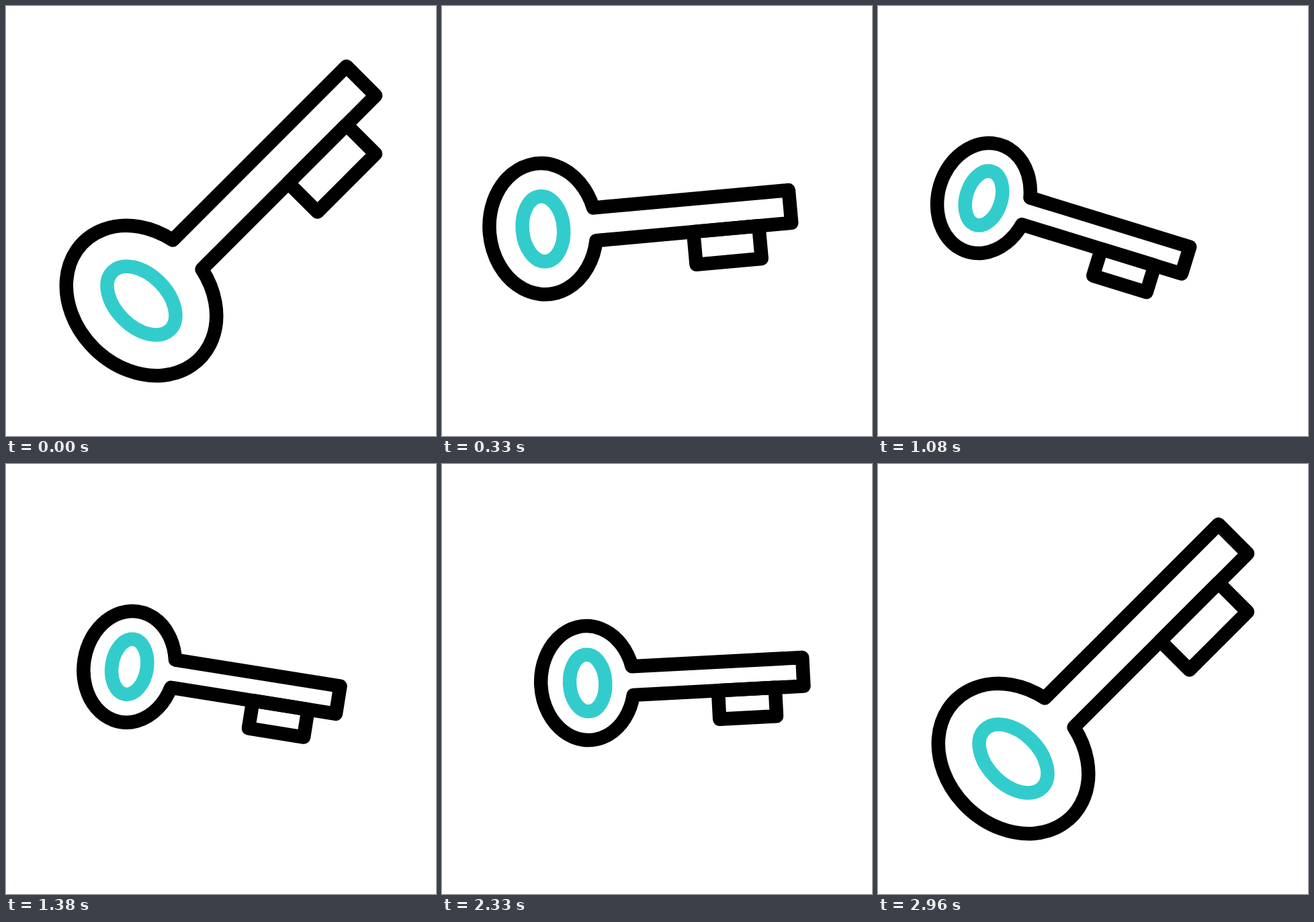
An HTML page that plays this animation: 640 by 640 pixels, repeating every 3000 ms.

```html
<!DOCTYPE html>
<html lang="en">
<head>
<meta charset="utf-8">
<title>Turning key</title>
<style>
html, body { margin: 0; width: 100%; height: 100%; overflow: hidden; background: #fff; }
svg { display: block; width: 100%; height: 100%; }

/* The key lies along x, with its turning point at 0,0. */
.key {
  fill: none; stroke: #000; stroke-width: 20.5;
  stroke-linejoin: round; stroke-linecap: round;
  transform-origin: 0 0;
  animation: move 3s infinite, size 3s infinite;
}
.key > * { vector-effect: non-scaling-stroke; animation: 3s ease-in-out infinite; }
.key > .body { animation-name: body; }
.key > .tooth { animation-name: tooth; }
.key > .ring { stroke: #3cc; animation-name: ring; }

/* swing down and back, push in, stay for the turn, return */
@keyframes move {
  0%, 1.39% { translate: 320px 320px; rotate: -45deg; animation-timing-function: ease; }
  27.78% { translate: 262.3px 319.5px; rotate: 18.2deg; animation-timing-function: cubic-bezier(.9, 0, .74, 1); }
  52.78%, 72.22% { translate: 333.5px 320px; rotate: -.95deg; animation-timing-function: cubic-bezier(.65, 0, .3, 1); }
  98.61%, 100% { translate: 320px 320px; rotate: -45deg; }
}
@keyframes size {
  0%, 1.39% { scale: 1; animation-timing-function: ease; }
  27.78%, 72.22% { scale: .68; animation-timing-function: cubic-bezier(.65, 0, .35, 1); }
  98.61%, 100% { scale: 1; }
}

/* the turn in the lock */
@keyframes body {
  0%, 54.17%, 72.22%, 100% { d: path("M-70.9 -30.7 L294.8 -30.7 L294.8 30.7 L-70.9 30.7 A99.9 122.4 0 1 1 -70.9 -30.7 Z"); }
  62.5%, 63.89% { d: path("M-70.9 -30.7 L294.8 -30.7 L294.8 30.7 L-70.9 30.7 A99.9 98.3 0 1 1 -70.9 -30.7 Z"); }
}
@keyframes tooth {
  0%, 54.17%, 72.22%, 100% { d: path("M111 30.7 L111 92 L233.3 92 L233.3 30.7 Z"); }
  62.5%, 63.89% { d: path("M111 30.7 L111 62.9 L233.3 62.9 L233.3 30.7 Z"); }
}
@keyframes ring {
  0%, 54.17%, 72.22%, 100% { ry: 60.9px; }
  62.5%, 63.89% { ry: 38.4px; }
}
</style>
</head>
<body>
<svg viewBox="0 0 640 640">
  <g class="key">
    <path class="body" d="M-70.9 -30.7 L294.8 -30.7 L294.8 30.7 L-70.9 30.7 A99.9 122.4 0 1 1 -70.9 -30.7 Z"/>
    <path class="tooth" d="M111 30.7 L111 92 L233.3 92 L233.3 30.7 Z"/>
    <ellipse class="ring" cx="-167.6" cy="0" rx="38.4" ry="60.9"/>
  </g>
</svg>
</body>
</html>
```
